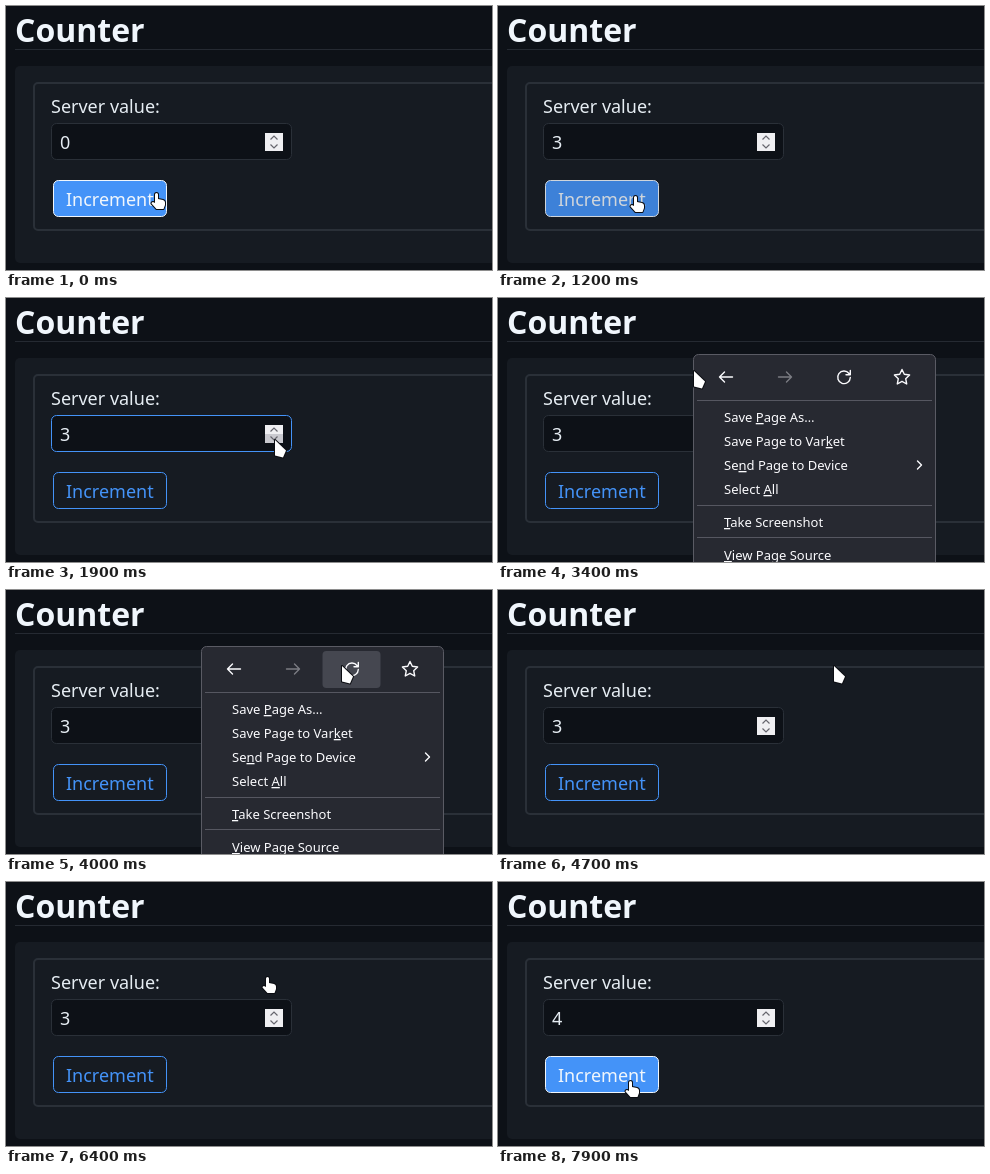
An HTML page that plays this animation: 486 px wide and 264 px high, repeating every 8000 ms.

```html
<!DOCTYPE html>
<html lang="en">
<head>
<meta charset="utf-8">
<title>Counter</title>
<style>
  html, body { margin: 0; width: 100%; height: 100%; overflow: hidden; background: #0d1117; }
  svg { display: block; width: 486px; height: 264px; }
  text { font: 18px "Noto Sans", sans-serif; fill: #e6edf3; white-space: pre; }
  .title { font-size: 32px; font-weight: bold; fill: #f0f6fc; }
  .menu text { font-size: 13px; fill: #fbfbfe; }
  .menu .icon { fill: none; stroke: #fbfbfe; stroke-width: 1.4; stroke-linecap: round; stroke-linejoin: round; }
  .menu .rule { stroke: #565761; }
  u, .key { text-decoration: underline; }
  .field { fill: #0d1117; stroke: #2a3038; }
  .field.hover { stroke: #4493f8; }
  .button rect { fill: #161b22; stroke: #4493f8; }
  .button text { fill: #4493f8; }
  .button.hover rect { fill: #4493f8; stroke: #f0f6fc; }
  .button.hover text { fill: #f0f6fc; }
  .cursor path { fill: #fff; stroke: #0b0d12; stroke-width: 2; stroke-linejoin: round; paint-order: stroke; }
</style>
</head>
<body>
<svg viewBox="0 0 486 264">
  <rect width="486" height="264" fill="#0d1117"/>
  <text class="title" x="9" y="36">Counter</text>
  <path d="M9 43.5H486" stroke="#252a32"/>

  <g id="panel">
    <rect x="9" y="60" width="520" height="197" rx="5" fill="#161b22"/>
    <rect x="28" y="77" width="500" height="147" rx="4" fill="none" stroke="#2a3038" stroke-width="2"/>
    <text x="45" y="107">Server value:</text>
    <rect id="field" class="field" x="45.5" y="117.5" width="240" height="36" rx="5"/>
    <text id="value" x="54" y="142.5"></text>
    <rect x="259" y="127" width="18" height="18" fill="#efeff2"/>
    <rect id="down" x="259" y="136" width="18" height="9" fill="#c9c9cf"/>
    <path d="M264.5 133.5l3.5-3.5 3.5 3.5M264.5 138.5l3.5 3.5 3.5-3.5" fill="none" stroke="#66666e" stroke-width="1.2"/>
    <g id="button" class="button">
      <rect x="47.5" y="174.5" width="113" height="36" rx="5"/>
      <text x="60" y="200">Increment</text>
    </g>
  </g>

  <g id="menu" class="menu">
    <rect x="195.5" y="56.5" width="242" height="230" rx="5" fill="#272931" stroke="#5a5b64"/>
    <rect id="highlight" y="61" width="58" height="37" rx="4" fill="#454750"/>
    <path class="icon" d="M234.5 79H221.5M226.5 74l-5 5 5 5"/>
    <path class="icon" d="M280.5 79H293.5M288.5 74l5 5-5 5" opacity=".4"/>
    <path class="icon" d="M351 75.5A6.3 6.3 0 1 0 352.3 79.5M352.3 72.5V76.7H348"/>
    <path id="star" class="icon"/>
    <path class="rule" d="M199 102.5H434M199 207.5H434M199 239.5H434"/>
    <path class="icon" d="M419.5 163l4 4-4 4"/>
    <text x="226" y="124">Save <tspan class="key">P</tspan>age As…</text>
    <text x="226" y="148">Save Page to Var<tspan class="key">k</tspan>et</text>
    <text x="226" y="172">Se<tspan class="key">n</tspan>d Page to Device</text>
    <text x="226" y="196">Select <tspan class="key">A</tspan>ll</text>
    <text x="226" y="229"><tspan class="key">T</tspan>ake Screenshot</text>
    <text x="226" y="262"><tspan class="key">V</tspan>iew Page Source</text>
  </g>

  <g id="cursor" class="cursor">
    <path id="arrow" d="M0 0L11 10.5 8 17.5 0 15.5z"/>
    <path id="hand" d="M-1 1.5Q-1 0 .5 0T2 1.5V6l5 1q2 .5 2 2.5V12l-1.5 4H.5L-4.5 10.5Q-4.5 9-3 9l2 1z"/>
  </g>
</svg>
<script>
const LOOP = 8000, STEP = 100;
const $ = id => document.getElementById(id);
const show = (id, on) => $(id).style.display = on ? '' : 'none';

// Cursor tip: time, x, y
const path = [
  [0, 150, 187], [300, 152, 189], [500, 152, 189], [900, 137, 190], [1200, 137, 190],
  [1900, 269, 142], [2100, 269, 142], [2600, 194, 56], [3100, 194, 56], [3400, 196, 73],
  [4000, 336, 76], [4800, 336, 76], [5100, 309, 74], [6300, 309, 74], [6400, 261, 95],
  [6800, 135, 195], [7500, 135, 195], [7700, 135, 201], [7900, 132, 199], [8000, 132, 199]
];
const increments = [100, 800, 1200, 7600];
const busy = [[600, 800], [900, 1300], [7200, 7400]];

function cursorAt(t) {
  const i = path.findIndex(key => key[0] > t);
  const [t0, x0, y0] = path[i - 1], [t1, x1, y1] = path[i];
  const k = (t - t0) / (t1 - t0);
  return [x0 + (x1 - x0) * k, y0 + (y1 - y0) * k];
}

function draw(t) {
  const [x, y] = cursorAt(t);
  const over = (l, top, r, b) => x >= l && x <= r && y >= top && y <= b;
  const onButton = over(47, 174, 161, 211);
  const menuOpen = t >= 2700 && t < 4600;
  const column = Math.floor((x - 199) / 58.5);
  const handShown = onButton || t >= 6400;

  $('value').textContent = increments.filter(at => t >= at).length;
  $('field').classList.toggle('hover', over(45, 117, 286, 154));
  $('button').classList.toggle('hover', onButton);
  $('button').setAttribute('opacity', busy.some(([a, b]) => t >= a && t < b) ? .85 : 1);
  show('down', over(259, 136, 277, 145));
  show('panel', t < 5400 || t >= 5500); // page reload
  show('menu', menuOpen);
  show('highlight', column >= 0 && column !== 1);
  $('highlight').setAttribute('x', 199.5 + 58.5 * column);
  $('highlight').setAttribute('fill', t >= 4500 ? '#5a5c66' : '#454750');
  show('hand', handShown);
  show('arrow', !handShown);
  $('cursor').setAttribute('transform', `translate(${Math.round(x)} ${Math.round(y)})`);
}

const starPoints = Array.from({ length: 10 }, (_, i) => {
  const r = i % 2 ? 3.9 : 8, a = (i / 5 - .5) * Math.PI;
  return `${(404 + r * Math.cos(a)).toFixed(1)} ${(79.5 + r * Math.sin(a)).toFixed(1)}`;
});
$('star').setAttribute('d', `M${starPoints.join('L')}z`);

const start = performance.now();
function tick() {
  const t = (performance.now() - start) % LOOP;
  draw(Math.floor(t / STEP) * STEP);
  requestAnimationFrame(tick);
}
tick();
</script>
</body>
</html>
```
